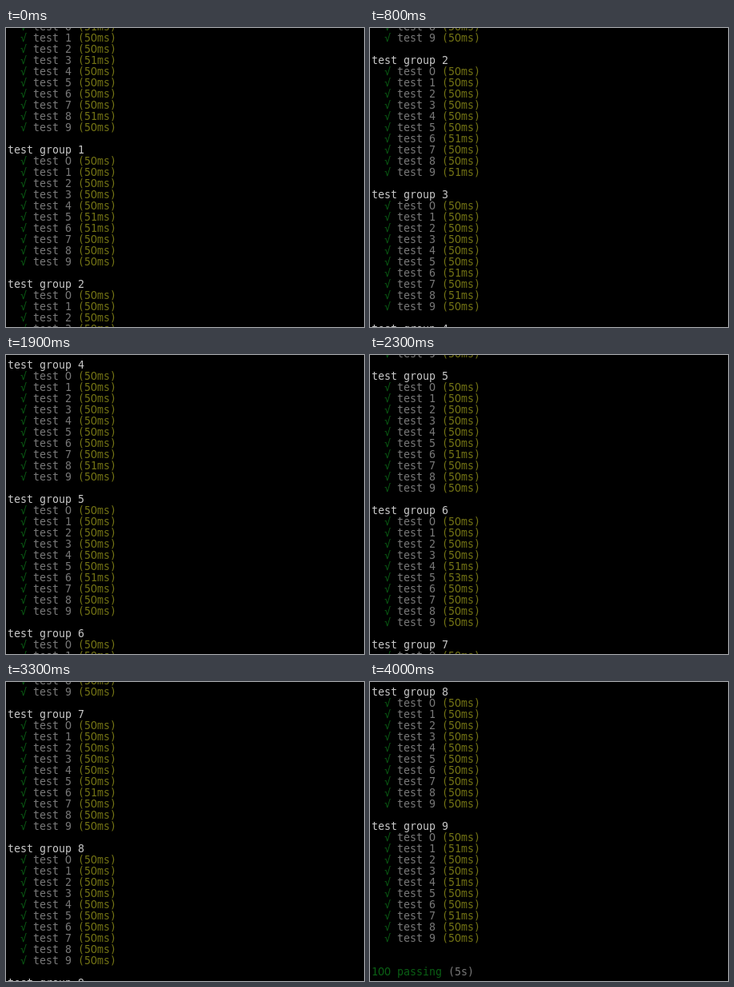
These frames come from a looping animation (448x374 px, 4.6 s). An HTML page:

```html
<!DOCTYPE html>
<html>
<head>
<meta charset="utf-8">
<style>
  html, body { margin: 0; background: #000; }
  main { position: relative; width: 448px; height: 374px; overflow: hidden; contain: strict; }
  pre {
    position: absolute; left: 2px; top: -22px; margin: 0;
    font: 13.29px/14px "DejaVu Sans Mono", monospace;
    color: #c8c8c8;
  }
  /* plain zero without the inner dot, in one 8px cell */
  i { display: inline-block; width: 8px; font: 13.29px/14px "DejaVu Sans", sans-serif; text-indent: -.2px; }
  .ok { color: #0a5f14; }
  .dim { color: #787878; }
  .slow { color: #737314; }
</style>
</head>
<body>
<main><pre id="log"></pre></main>
<script>
const LINE = 14, STEP = 100, LOOP = 4600;
// lines scrolled on each step
const ADVANCE = [..."2242222422224222242222522232222242222222"].map(Number);
const SLOWER = new Set([0, 3, 8, 15, 16, 26, 29, 36, 38, 48, 56, 64, 76, 91, 94, 97]);

const span = (name, text) => `<span class="${name}">${text.replace(/0/g, "<i>0</i>")}</span>`;
const duration = n => n === 65 ? 53 : SLOWER.has(n) ? 51 : 50;

const lines = [];
for (let group = 0; group < 10; group++) {
  lines.push(span("title", `test group ${group}`));
  for (let test = 0; test < 10; test++) {
    const ms = duration(group * 10 + test);
    lines.push(`  ${span("ok", "√")} ${span("dim", `test ${test}`)} ${span("slow", `(${ms}ms)`)}`);
  }
  lines.push("");
}
lines.push("", `${span("ok", "100 passing")} ${span("dim", "(5s)")}`);

const log = document.getElementById("log");
log.innerHTML = lines.join("\n");

function draw() {
  const step = Math.floor(performance.now() % LOOP / STEP);
  const scrolled = ADVANCE.slice(0, step).reduce((sum, n) => sum + n, 0);
  log.style.transform = `translateY(${-scrolled * LINE}px)`;
  requestAnimationFrame(draw);
}
draw();
</script>
</body>
</html>
```
